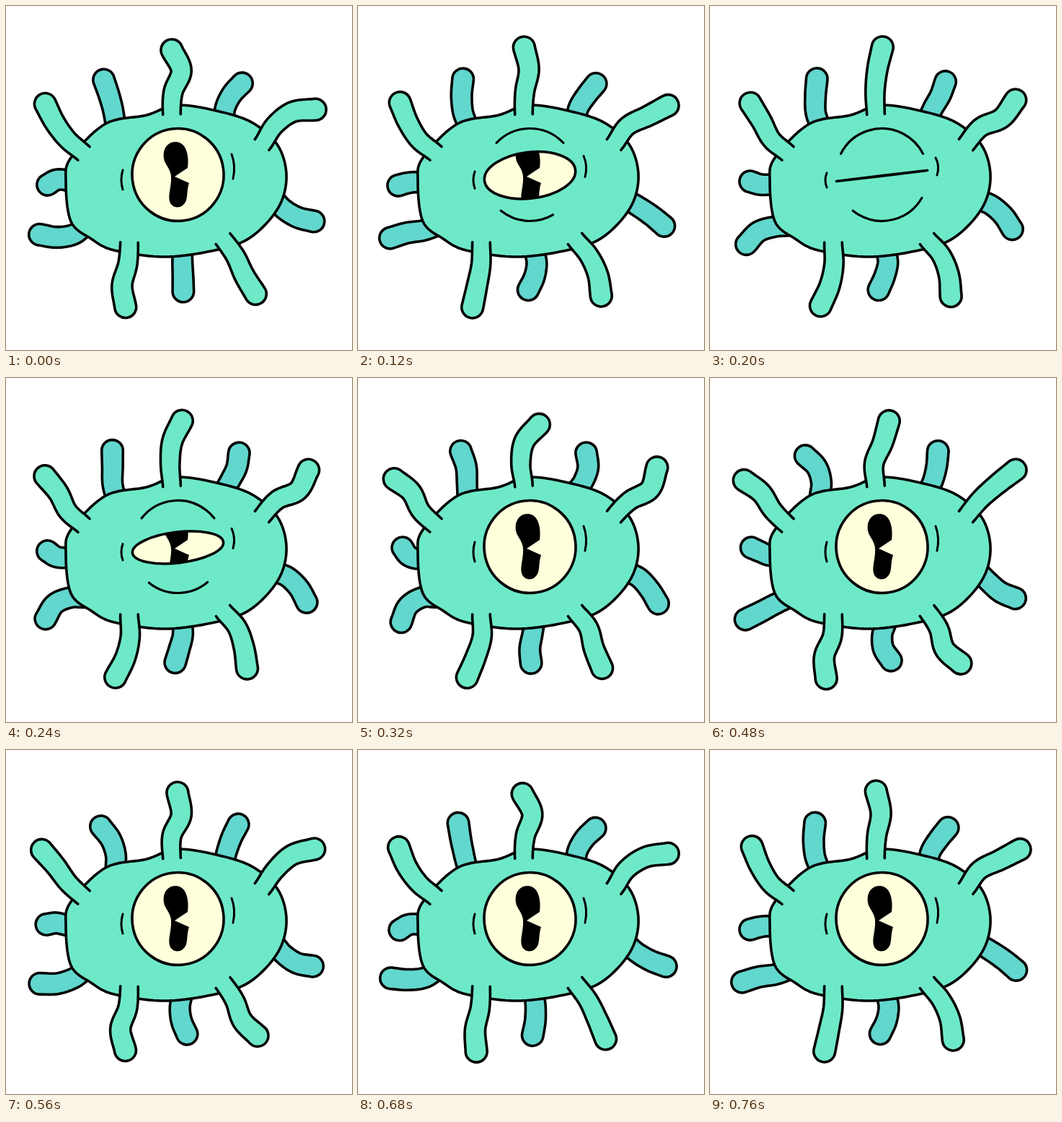
An HTML page with a canvas that plays this animation: 480x476 px, repeating every 800 ms.

```html
<!DOCTYPE html>
<html lang="en">
<head>
<meta charset="utf-8">
<title>Blinking microbe</title>
<style>
  html, body { margin: 0; width: 100%; height: 100%; overflow: hidden; background: #fff; }
  canvas { display: block; width: 100vw; height: 100vh; }
</style>
</head>
<body>
<canvas id="stage" width="480" height="476"></canvas>
<script>
const ctx = document.getElementById('stage').getContext('2d');
const SKIN = '#6ee9c8', SHADE = '#62d7cd', EYE = '#ffffdb', INK = '#000';
const STEP = 40, STEPS = 20, SWAY = 16;
const RAD = Math.PI / 180;
const EYE_X = 238.5, EYE_Y = 233.5, EYE_R = 64;

// A swing runs along three joints: each has its share of it and its delay in degrees.
const FRONT = { fill: SKIN, rootHalf: 12.3, tipHalf: 15, bulge: 12, share: [0.18, 0.28, 1], delay: [190, 115, 0] };
const BACK = { fill: SHADE, rootHalf: 13.5, tipHalf: 14.8, bulge: 3, share: [0.45, 0.35, 1], delay: [165, 40, 0] };

const limb = (kind, x, y, length, heading, curl, swing, phase) =>
  ({ ...kind, root: [x, y], length, heading, curl, swing, phase });

const backLimbs = [
  limb(BACK, 152, 168, 68, -102, -7, 26, 90),
  limb(BACK, 301, 160, 61, -70, -2, 28, 27),
  limb(BACK, 96, 246, 41, 187, 5, 43, 196),
  limb(BACK, 114, 303, 72, 157, -6, 38, -4),
  limb(BACK, 370, 266, 67, 36, 0, 26, 150),
  limb(BACK, 245, 336, 59, 91, -4, 30, 86)
];

const frontLimbs = [
  limb(FRONT, 230, 150, 94, -87, 5, 34, 194),
  limb(FRONT, 108, 204, 88, -134, 4, 19, 48),
  limb(FRONT, 355, 192, 95, -45, 6, 33, -2),
  limb(FRONT, 171, 327, 91, 94, 3, 20, 143),
  limb(FRONT, 301, 322, 89, 58, 5, 22, 102)
];

const body = [
  [83, 243], [90, 210], [138, 163], [195, 151], [240, 137], [312, 150], [352, 168], [380, 198],
  [389, 240], [376, 282], [338, 321], [290, 338], [220, 347], [150, 338], [118, 322], [90, 298]
];

const along = ([x, y], degrees, distance) =>
  [x + distance * Math.cos(degrees * RAD), y + distance * Math.sin(degrees * RAD)];

// Smooth curve from b to c, with a and d as the neighbours.
function curve(a, b, c, d, parts = 10) {
  return Array.from({ length: parts }, (_, s) => {
    const u = s / parts, u2 = u * u, u3 = u2 * u;
    return [0, 1].map(j => b[j] + (c[j] - a[j]) / 2 * u
      + (a[j] - 2.5 * b[j] + 2 * c[j] - d[j] / 2) * u2
      + (1.5 * (b[j] - c[j]) + (d[j] - a[j]) / 2) * u3);
  });
}

function paint(fill, width = 3.6) {
  if (fill) { ctx.fillStyle = fill; ctx.fill(); }
  ctx.lineWidth = width;
  ctx.stroke();
}

function limbSpine({ root, length, heading, curl, bulge, swing, phase, share, delay }, time) {
  const part = length / 3;
  const points = [root];
  let angle;
  for (let i = 0; i < 3; i++) {
    const wave = Math.cos((360 * time / SWAY - phase - delay[i]) * RAD);
    angle = heading + (i - 1) * curl + (i === 1 ? bulge : 0) + swing * share[i] * wave;
    points.push(along(points[i], angle, part));
  }
  // The skin holds the root at a fixed angle.
  const before = along(points[1], heading - curl, -2 * part);
  const after = along(points[3], angle, part);
  const p = [before, ...points, after];
  return [1, 2, 3].flatMap(i => curve(p[i - 1], p[i], p[i + 1], p[i + 2])).concat([points[3]]);
}

function drawLimb(limb, time) {
  const spine = limbSpine(limb, time);
  const end = spine.length - 1;
  const angleAt = i => {
    const a = spine[Math.max(i - 1, 0)], b = spine[Math.min(i + 1, end)];
    return Math.atan2(b[1] - a[1], b[0] - a[0]) / RAD;
  };
  const edge = (i, side) => {
    const half = limb.rootHalf + (limb.tipHalf - limb.rootHalf) * i / end;
    ctx.lineTo(...along(spine[i], angleAt(i) + side * 90, half));
  };
  const tipAngle = angleAt(end) * RAD;
  ctx.beginPath();
  for (let i = 0; i < end; i++) edge(i, -1);
  ctx.arc(...spine[end], limb.tipHalf, tipAngle - Math.PI / 2, tipAngle + Math.PI / 2);
  for (let i = end - 1; i >= 0; i--) edge(i, 1);
  paint(limb.fill);
}

function drawBody() {
  const at = i => body[(i + body.length) % body.length];
  ctx.beginPath();
  body.flatMap((p, i) => curve(at(i - 1), p, at(i + 1), at(i + 2))).forEach(p => ctx.lineTo(...p));
  ctx.closePath();
  paint(SKIN);
}

function drawPupil() {
  ctx.beginPath();
  ctx.moveTo(234, 236);
  ctx.lineTo(252, 224);
  ctx.bezierCurveTo(254, 211, 252, 188, 235, 188);
  ctx.bezierCurveTo(221, 188, 215, 204, 221, 217);
  ctx.bezierCurveTo(226, 226, 230, 230, 229, 242);
  ctx.bezierCurveTo(228, 255, 225, 262, 227, 270);
  ctx.bezierCurveTo(230, 281, 245, 282, 250, 269);
  ctx.bezierCurveTo(252, 262, 251, 253, 254, 245);
  ctx.closePath();
  ctx.fillStyle = INK;
  ctx.fill();
}

function wrinkle(x, y, cx, cy, ex, ey) {
  ctx.beginPath();
  ctx.moveTo(x, y);
  ctx.quadraticCurveTo(cx, cy, ex, ey);
  paint(null, 3);
}

function crease(from, to) {
  ctx.beginPath();
  ctx.arc(EYE_X, EYE_Y, EYE_R, from * RAD, to * RAD);
  paint(null, 3.2);
}

// The lids close over four steps and open again over three.
const openness = step => Math.min(1, Math.max((5 - step) / 4, (step - 5) / 3));

function drawEye(step) {
  const open = openness(step);
  const shut = 1 - open;
  const lids = () => {
    ctx.beginPath();
    ctx.ellipse(EYE_X, EYE_Y + 1.5 * shut, EYE_R - 0.5, Math.max(EYE_R * open, 0.1), -0.118, 0, 2 * Math.PI);
  };
  ctx.save();
  lids();
  ctx.clip();
  ctx.fillStyle = EYE;
  ctx.fill();
  drawPupil();
  ctx.restore();
  lids();
  paint(null);
  if (shut > 0.3) {
    const reach = 30 + 33 * shut;
    crease(-90 - reach, -90 + reach);
    crease(90 - 60 * shut, 129);
  }
  wrinkle(162, 227 + 4 * shut, 158, 241, 162, 254 - 3 * shut);
  wrinkle(313, 205 + 5 * shut, 319, 221, 315, 239 - 5 * shut);
}

function render(now) {
  const step = Math.floor(now / STEP) % STEPS;
  ctx.fillStyle = '#fff';
  ctx.fillRect(0, 0, 480, 476);
  ctx.strokeStyle = INK;
  ctx.lineCap = ctx.lineJoin = 'round';
  backLimbs.forEach(l => drawLimb(l, step));
  drawBody();
  frontLimbs.forEach(l => drawLimb(l, step));
  drawEye(step);
}

const start = performance.now();
function tick() {
  render(performance.now() - start);
  requestAnimationFrame(tick);
}
tick();
</script>
</body>
</html>
```
